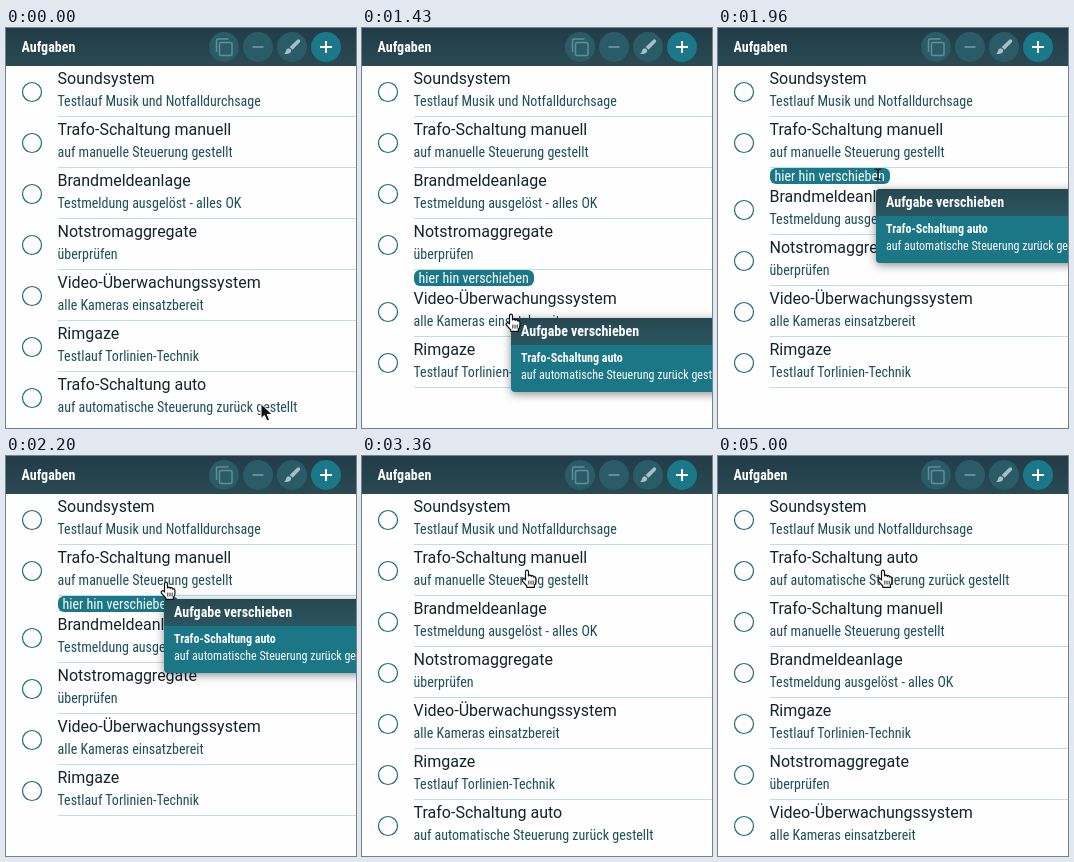
Animation, 350 px wide and 400 px high, one loop 6700 ms. Source, as an HTML page:

```html
<!DOCTYPE html>
<html lang="de">
<head>
<meta charset="utf-8">
<title>Aufgaben</title>
<style>
  html, body { margin: 0; width: 100%; height: 100%; overflow: hidden; background: #fdfefd; }
  svg { display: block; width: 350px; height: 400px; cursor: default; }
  text { font-family: Roboto, "Liberation Sans", sans-serif; white-space: pre; }
  .title { font-size: 16px; fill: #14242c; }
  .cond { font-family: "Roboto Condensed", Roboto, "Liberation Sans", sans-serif; font-stretch: 75%; font-size: 14px; }
  .small { font-size: 12px; }
  .bold { font-weight: 700; }
  .sub { fill: #1c4f5b; }
  .white { fill: #fff; }
  .popup { filter: drop-shadow(0 2px 5px rgba(0, 0, 0, .45)); }
</style>
</head>
<body>
<svg id="stage" viewBox="0 0 350 400">
  <defs>
    <linearGradient id="bar" x2="0" y2="1">
      <stop stop-color="#213c46"/><stop offset="1" stop-color="#2a4a54"/>
    </linearGradient>
    <linearGradient id="head" x2="0" y2="1">
      <stop stop-color="#264750"/><stop offset="1" stop-color="#2b5660"/>
    </linearGradient>
  </defs>
  <rect width="350" height="400" fill="#fdfefd"/>
  <g id="list"></g>
  <g id="marker"><rect x="52" width="120" height="16" rx="6" fill="#1b7889"/></g>
  <g id="bar-group">
    <rect width="350" height="38" fill="url(#bar)"/>
    <g fill="#2a5c68">
      <circle cx="218" cy="19" r="15"/><circle cx="252" cy="19" r="15"/><circle cx="286" cy="19" r="15"/>
    </g>
    <circle cx="320" cy="19" r="15" fill="#1b7889"/>
    <g fill="none" stroke="#628d97" stroke-width="1.5">
      <rect x="213.5" y="14.5" width="12.5" height="13" rx="1.5"/>
      <path d="M210.5 24V12.5Q210.5 11 212 11H222.5"/>
      <path d="M246.5 19H257.5" stroke-width="2"/>
    </g>
    <path d="M293.3 11.5Q295 12.8 293.8 14.3L286.5 21.8L283.7 19L291.3 11.8Q292.3 11 293.3 11.5ZM282.5 20.2Q285.5 20.8 285.2 23.3Q283.7 27 278 25.8Q280 24.8 280 22.8Q280.5 20.2 282.5 20.2Z" fill="#a9bfc4"/>
    <path d="M314 19H326M320 13V25" stroke="#fff" stroke-width="2"/>
  </g>
  <g id="popup">
    <g class="popup">
      <rect width="260" height="74" rx="4" fill="#1b7686"/>
      <path d="M0 27V4Q0 0 4 0H260V27Z" fill="url(#head)"/>
    </g>
  </g>
  <g id="cursor" stroke-linejoin="round" stroke-linecap="round">
    <path id="arrow" d="M0 0V14.5L3.4 11.4L5.9 17L8.6 15.8L6.2 10.4H11Z" fill="#111" stroke="#fff"/>
    <g id="hand" fill="#fff" stroke="#111" stroke-width="1.2">
      <path d="M-1.5 10V1.6Q-1.3 .2 0 .2T1.5 1.6V6Q2 5 3 5.2T4.2 6.3Q5 5.4 6 5.9T6.8 7.1Q8.8 6.4 8.9 8.4V12Q8.9 13.6 7.4 15.2V17.4H-.2V16L-4.8 10.8Q-5.2 9.2-3.8 8.8T-1.5 10Z"/>
      <path d="M1.8 11V14.2M4 11V14.2M6.2 11V14.2" stroke-width=".9"/>
    </g>
    <path id="beam" d="M-3-5Q0-5 0-3.5Q0-5 3-5M0-3.5V4M-3 5.5Q0 5.5 0 4Q0 5.5 3 5.5" fill="none" stroke="#111" stroke-width="1.2"/>
  </g>
</svg>
<script>
const LOOP = 6700, TOP = 38, PITCH = 51, GAP = 16;
const DRAG = 900, DROP = 3360, SHUFFLE = 4560, SETTLE = 5000;

const tasks = [
  ["Soundsystem", "Testlauf Musik und Notfalldurchsage"],
  ["Trafo-Schaltung manuell", "auf manuelle Steuerung gestellt"],
  ["Brandmeldeanlage", "Testmeldung ausgelöst - alles OK"],
  ["Notstromaggregate", "überprüfen"],
  ["Video-Überwachungssystem", "alle Kameras einsatzbereit"],
  ["Rimgaze", "Testlauf Torlinien-Technik"],
  ["Trafo-Schaltung auto", "auf automatische Steuerung zurück gestellt"]
];
const MOVED = 6;
const startOrder = [0, 1, 2, 3, 4, 5, 6];
const mixedOrder = [0, 2, 6, 1, 3, 4, 5];
const finalOrder = [0, 6, 1, 2, 5, 3, 4];

// time, x, y
const cursorPath = [
  [100, 255, 376], [600, 149, 366], [900, 149, 366], [1060, 152, 330],
  [1430, 149, 286], [1560, 149, 270], [1600, 149, 268], [1960, 159.5, 146],
  [2260, 160, 121], [2300, 160, 120], [2430, 164.5, 114]
];
const popupPath = [
  [900, 149, 366], [1060, 149, 350], [1430, 149, 290], [1560, 149, 272],
  [1600, 149, 268], [1960, 158, 161], [2260, 158, 138], [2300, 158, 136], [2430, 163, 114]
];

const $ = id => document.getElementById(id);

function add(parent, tag, attrs) {
  const node = document.createElementNS("http://www.w3.org/2000/svg", tag);
  for (const key in attrs) node.setAttribute(key, attrs[key]);
  parent.appendChild(node);
  return node;
}

function move(node, x, y) {
  node.setAttribute("transform", `translate(${x} ${y})`);
}

function show(node, on) {
  node.style.display = on ? "" : "none";
}

// Emulates the condensed face where only the normal width exists.
const probe = add($("stage"), "text", { class: "cond" });
probe.textContent = tasks[0][1];
const squeeze = probe.getComputedTextLength() > 215 ? 0.885 : 1;
probe.remove();

function write(parent, x, y, style, words) {
  const scale = style.includes("cond") ? squeeze : 1;
  const node = add(parent, "text", {
    class: style, transform: `translate(${x} ${y}) scale(${scale} 1)`
  });
  node.textContent = words;
}

const rows = tasks.map(([title, note]) => {
  const row = add($("list"), "g", {});
  add(row, "circle", { cx: 26, cy: 26, r: 9.5, fill: "none", stroke: "#1d6b7b", "stroke-width": 1.2 });
  write(row, 51.5, 18, "title", title);
  write(row, 51.5, 40, "cond sub", note);
  row.line = add(row, "path", { d: "M52 50.5H350", stroke: "#b9e0e5" });
  return row;
});
write($("marker"), 56.5, 12.5, "cond white", "hier hin verschieben");
write($("bar-group"), 15.5, 24, "cond bold white", "Aufgaben");
write($("popup"), 10, 18, "cond bold white", "Aufgabe verschieben");
write($("popup"), 10, 44, "cond small bold white", tasks[MOVED][0]);
write($("popup"), 10, 61, "cond small white", tasks[MOVED][1]);

function along(path, t) {
  const i = path.findIndex(key => key[0] > t);
  if (i === 0) return path[0].slice(1);
  if (i < 0) return path[path.length - 1].slice(1);
  const [a, b] = [path[i - 1], path[i]];
  const k = (t - a[0]) / (b[0] - a[0]);
  return [1, 2].map(n => a[n] + (b[n] - a[n]) * k);
}

function render(t) {
  const dragging = t >= DRAG && t < DROP;
  const order = t < SHUFFLE ? startOrder : t < SETTLE ? mixedOrder : finalOrder;
  const [px, py] = along(popupPath, t).map(Math.round);
  const [cx, cy] = along(cursorPath, t);
  const slot = Math.min(MOVED, Math.floor((py - TOP) / PITCH));
  const slotY = TOP + slot * PITCH;

  order.forEach((id, i) => {
    move(rows[id], 0, TOP + i * PITCH + (dragging && i >= slot ? GAP : 0));
    show(rows[id], !(dragging && id === MOVED));
    show(rows[id].line, i < order.length - 1);
  });

  show($("marker"), dragging);
  show($("popup"), dragging);
  move($("marker"), 0, slotY);
  move($("popup"), px, py);

  const onMarker = dragging && cy >= slotY && cy < slotY + GAP;
  move($("cursor"), Math.round(cx), Math.round(cy));
  show($("arrow"), t < 100);
  show($("beam"), onMarker);
  show($("hand"), t >= 100 && !onMarker);
}

const start = performance.now();
function tick() {
  render((performance.now() - start) % LOOP);
  requestAnimationFrame(tick);
}
tick();
</script>
</body>
</html>
```
